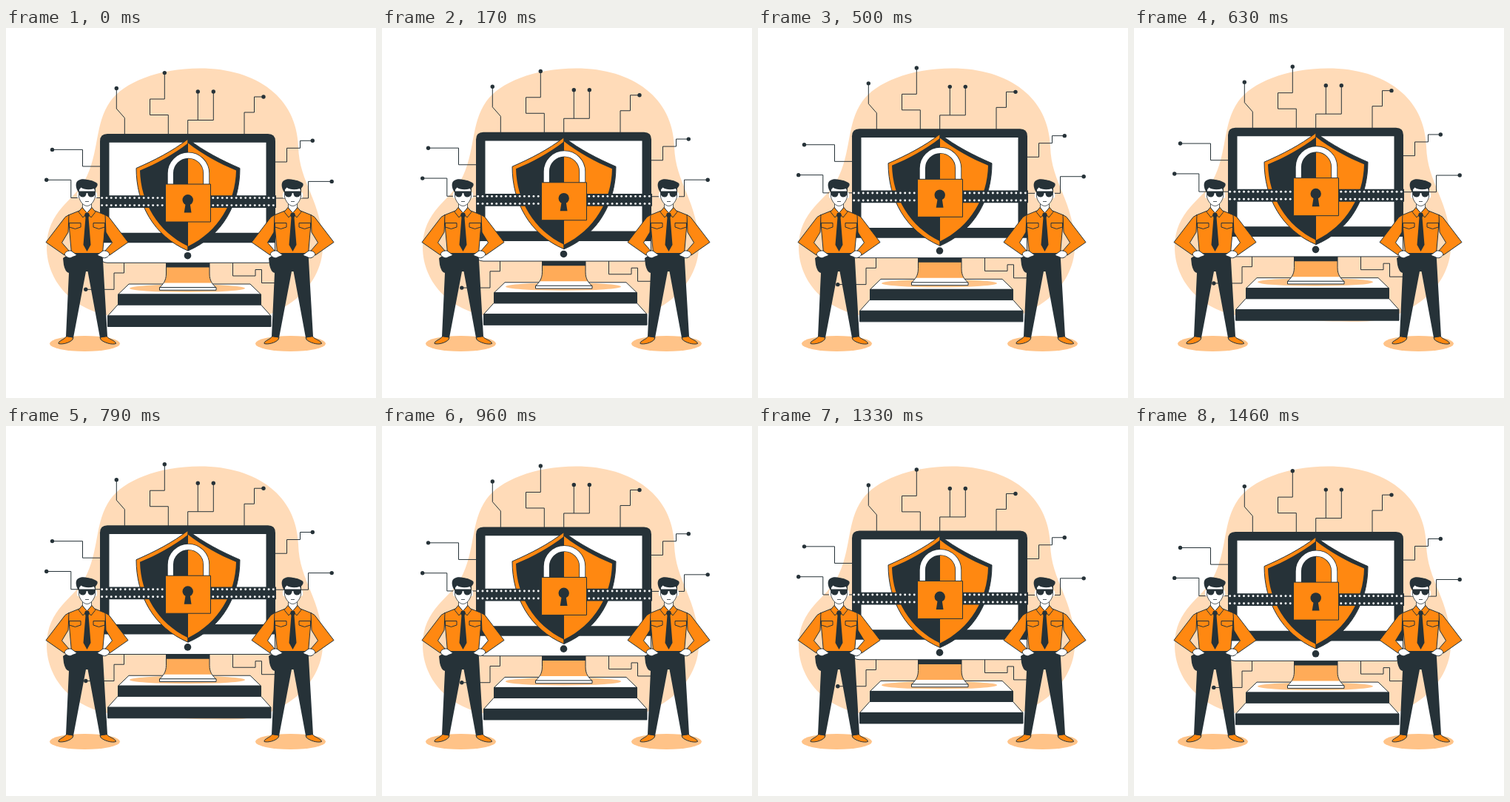
These frames come from a looping animation (500 by 500 pixels, 1.5 s). An HTML page with a canvas:

```html
<!DOCTYPE html>
<html lang="en">
<head>
<meta charset="utf-8">
<title>Guarded computer</title>
<style>
  html, body { margin: 0; width: 100%; height: 100%; overflow: hidden; background: #fff; }
  canvas { display: block; width: 500px; height: 500px; }
</style>
</head>
<body>
<canvas id="stage" width="500" height="500"></canvas>
<script>
const ctx = document.getElementById('stage').getContext('2d');
const DARK = '#263238', ORANGE = '#ff8811', PALE = '#ffdbb8', PEACH = '#ffc388', MID = '#ffab58', WHITE = '#fff';
const LOOP = 1500, FPS = 24, LIFT = 10;

function shape(d, fill, stroke, width = 1) {
  const path = new Path2D(d);
  if (fill) { ctx.fillStyle = fill; ctx.fill(path); }
  if (stroke) { ctx.strokeStyle = stroke; ctx.lineWidth = width; ctx.stroke(path); }
}

function ellipse(x, y, rx, ry, fill) {
  ctx.beginPath();
  ctx.ellipse(x, y, rx, ry, 0, 0, Math.PI * 2);
  ctx.fillStyle = fill;
  ctx.fill();
}

const dot = (x, y, r, fill = DARK) => ellipse(x, y, r, r, fill);

function flipped(axis, draw) {
  ctx.save();
  ctx.translate(2 * axis, 0);
  ctx.scale(-1, 1);
  draw();
  ctx.restore();
}

function mirrored(axis, draw) {
  draw();
  flipped(axis, draw);
}

// Each trace starts at its round terminal.
const traces = [
  [149.3, 81.5, 'V109 L160.3 121.5 V144'],
  [214.3, 60.6, 'V96 H194.5 V117.5 H219.3 V144'],
  [259.3, 86, 'V124.5'],
  [280.3, 86, 'V124.5 H245.7 V152'],
  [348, 93, 'H335.5 V114 H322 V144'],
  [414.3, 152.3, 'H397.5 V162.3 H379.5 V181 H363'],
  [440.2, 207.4, 'H408.5 V230 H363'],
  [62.5, 164.4, 'H103.5 V187 H128'],
  [54.7, 205.3, 'H87.8 V229.5 H128'],
  [107.8, 353.3, 'H146 V331 H159.5 V317']
];

function circuits() {
  for (const [x, y, d] of traces) {
    shape(`M${x} ${y}${d}`, null, DARK);
    dot(x, y, 2.7);
  }
  shape('M306.5 317V335H337V326.5H345.5V344.5H370', null, DARK);
}

function platform() {
  shape('M151 374H344.5L358 389H137.5Z', WHITE, DARK);
  shape('M137.5 389H358V403.5H137.5Z', DARK, DARK);
  shape('M166 346H330L344.5 360H151.5Z', WHITE, DARK);
  shape('M151.5 360H344.5V374H151.5Z', DARK, DARK);
  ellipse(245, 351.7, 78, 5.3, PEACH);
}

function monitor() {
  const neck = 'M216.5 317H275V332C275 342 279 346 284 351H207.5C212 346 216.5 342 216.5 332Z';
  shape(neck, WHITE);
  ctx.save();
  ctx.clip(new Path2D(neck));
  shape('M200 317H290V344.5H200Z', MID);
  shape('M200 317H290V323.5H200Z', DARK);
  ctx.restore();
  shape(neck, null, DARK);
  shape('M207.5 350.5H284V354.3H207.5Z', WHITE, DARK);

  shape('M127.5 288H363.5V308Q363.5 317.3 354 317.3H137Q127.5 317.3 127.5 308Z', WHITE, DARK);
  shape('M127 290.3V153Q127 143 137 143H354Q364 143 364 153V290.3Z', DARK);
  shape('M139.5 154.7H351.5V276.7H139.5Z', WHITE);
  dot(245.5, 307.7, 4.8);
}

function shield() {
  const rim = 'M246 150C225 166.5 200 179 176 189.5C176 237 199 281 246 301Z';
  const face = 'M246 155.5C226 171 204 183 181 192.5C182 236 205 275 246 295Z';
  shape(rim, ORANGE, DARK);
  shape(face, DARK);
  flipped(246, () => {
    shape(rim, DARK, DARK);
    shape(face, ORANGE);
  });
}

function chains() {
  for (const [left, first] of [[127, 129.7], [277, 279.8]]) {
    shape(`M${left} 226.2h88v16.8h-88Z`, DARK);
    for (const y of [229.6, 239.6]) {
      for (let i = 0; i < 14; i++) dot(first + i * 6.27, y, 1.45, WHITE);
    }
  }
}

function padlock() {
  const shackle = 'M222.3 212V196.3A24.2 24.2 0 0 1 270.7 196.3V212';
  shape(shackle, null, DARK, 8.8);
  shape(shackle, null, WHITE, 7.2);
  shape('M215.5 211H276.5V262H215.5Z', ORANGE, DARK);
  dot(245.7, 232.3, 7.2);
  shape('M243.2 234H248.2L250.5 249.5H240.7Z', DARK);
}

function arm() {
  shape('M85 252.5L80 255.5L54 289.5L79 307L85 301L75.5 290L84 276Z', ORANGE, DARK);
  shape('M79 306C80 302 84 300.5 88 301L95.5 306.5C94 309 90 308.5 88 310.5C84 311.5 81 309 79 306Z', WHITE, DARK);
}

function head() {
  shape('M103.5 234V243L109.5 251L115.5 243V234Z', WHITE, DARK, .8);
  mirrored(109.5, () => ellipse(97.8, 226, 2, 4, WHITE));
  shape('M98.5 213V228C100 235 105 240.5 109.5 240.5S119 235 120.5 228V213Z', WHITE, DARK, .8);
  shape('M98 222C94.5 217 93 209.5 97 206.5C101 203.5 106 204 110 205C115 206 119 206.5 123.3 210C124.5 213 122.5 215 121 216.5L120.8 222L119 217C113 219 105 218.5 101.5 215.5L99.3 218Z', DARK);
  shape('M98 220.5H121L119.8 226Q118 229 114.5 228.5Q110.8 228 110.3 223H108.7Q108.2 228 104.5 228.5Q101 229 99.2 226Z', DARK);
  shape('M107 234.5H112', null, DARK, .8);
}

function guard(dx) {
  ctx.save();
  ctx.translate(dx, 0);
  ellipse(106.5, 426.5, 47.5, 10.5, PEACH);
  shape('M82 416.5L91 418L90 421C86 425.5 76 428 71 426.5C70 423 79 421 82 416.5Z', ORANGE, DARK);
  shape('M127 418L136 416.5C139 421 148 422 148.5 426.5C143 428.5 132 425 128 421Z', ORANGE, DARK);
  shape('M87 304H130.5L132.5 340L137 417L127 418.5L110.5 329H108L91 418.5L81 417L85 331Q80 330 78 320L77 311Z', DARK);
  shape('M99 247L84 253L88.5 304.5H130.5L135 253L120 247Z', ORANGE, DARK);
  mirrored(109.5, arm);
  head();
  mirrored(109.5, () => {
    shape('M103 242.5L98 248.5L104 256L109.5 250Z', ORANGE, DARK);
    shape('M85.5 263.5H101V269L93.5 271.5L85.5 269Z', null, DARK);
  });
  shape('M107 250H112L113 253.5L111.5 256L114.5 293L109.5 302L104.5 293L107.5 256L106 253.5Z', DARK);
  ctx.restore();
}

function lift(ms) {
  const step = Math.floor(ms % LOOP * FPS / 1000 + .1);
  const phase = (step / FPS * 1000 + 25) % LOOP / LOOP;
  return LIFT * (1 - Math.abs(1 - 2 * phase));
}

const rest = lift(0);

function draw(ms) {
  ctx.fillStyle = WHITE;
  ctx.fillRect(0, 0, 500, 500);
  shape('M262 54.5C205 54.5 159 74 141 99C119 130 127 168 106 207C93 232 55 247 55 296C55 347 97 384 145 389C215 394 260 397 302 397C372 397 428 350 428 295C428 235 396 210 395 160C393 95 340 54.5 262 54.5Z', PALE);
  ctx.save();
  ctx.translate(0, rest - lift(ms));
  circuits();
  platform();
  monitor();
  shield();
  chains();
  padlock();
  ctx.restore();
  guard(0);
  guard(278);
}

const start = performance.now();
function tick() {
  draw(performance.now() - start);
  requestAnimationFrame(tick);
}
tick();
</script>
</body>
</html>
```
